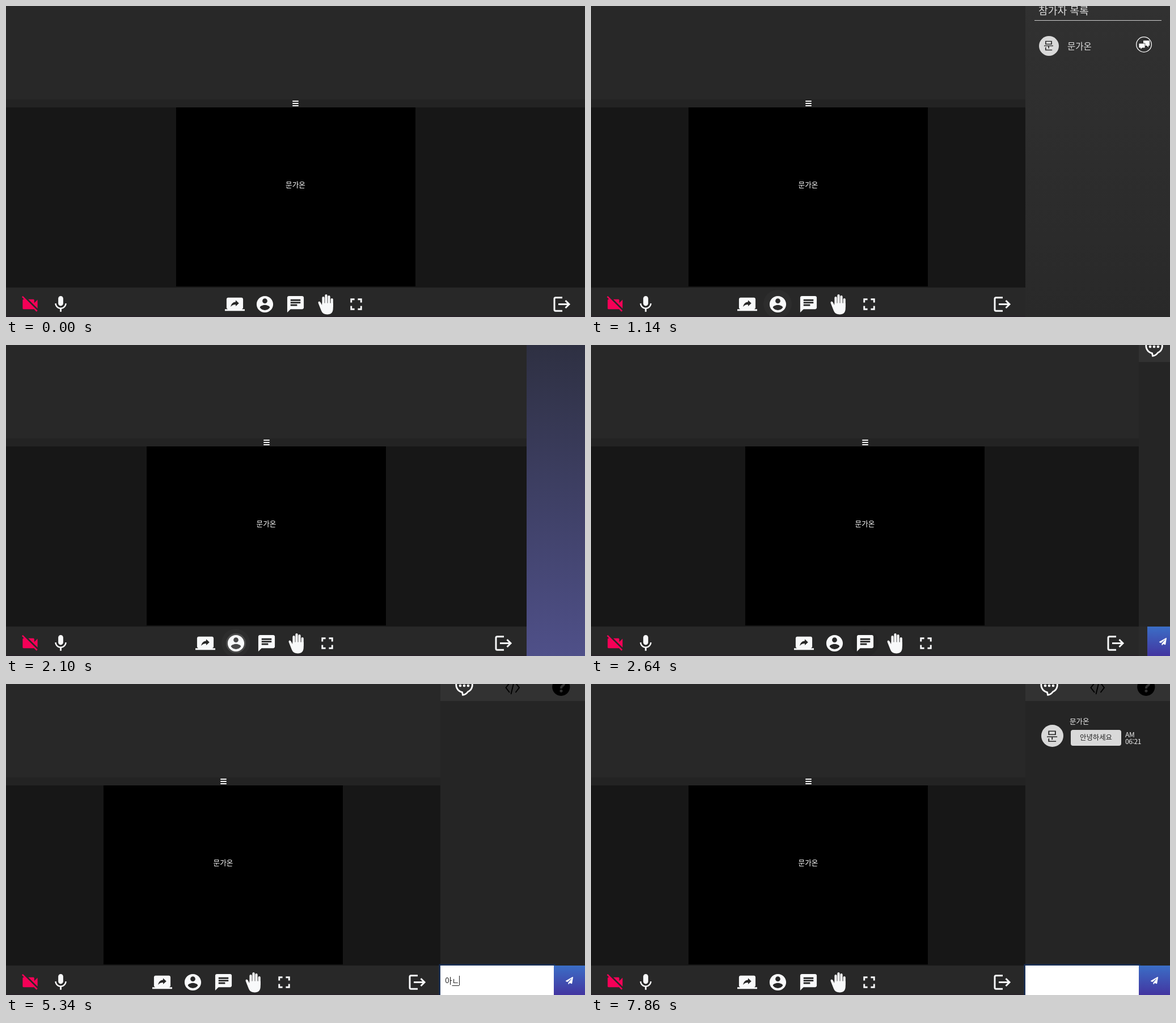
Animation of 1021 by 549 pixels, one loop 8 s. Source, as an HTML page:

```html
<!DOCTYPE html>
<html lang="ko">
<head>
<meta charset="utf-8">
<title>화상 회의</title>
<style>
@property --w { syntax: '<length>'; inherits: true; initial-value: 1021px; }

html, body { margin: 0; width: 100%; height: 100%; overflow: hidden; background: #282828; }
#stage {
  position: relative; width: 1021px; height: 549px; overflow: hidden;
  background: linear-gradient(#2e3042, #4f5089);
  font-family: "Noto Sans CJK KR", "Noto Sans KR", "Noto Sans CJK", "Noto Sans", sans-serif;
  animation: resize 8s step-end infinite;
}
#stage * { box-sizing: border-box; }
#stage div, #stage svg { position: absolute; }
svg { overflow: visible; }

/* width left for the call while side panels open and close */
@keyframes resize {
  0% { --w: 1021px; }
  10.5% { --w: 1013px; } 11.25% { --w: 937px; } 12% { --w: 847px; }
  12.75% { --w: 795px; } 13.5% { --w: 771px; } 14.25% { --w: 766px; }
  25.5% { --w: 810px; } 26.25% { --w: 918px; } 27% { --w: 977px; }
  27.75% { --w: 1010px; } 28.5% { --w: 1021px; }
  32.25% { --w: 1008px; } 33% { --w: 966px; } 33.75% { --w: 960px; }
  34.5% { --w: 958px; } 37.5%, 100% { --w: 766px; }
}

.main { left: 0; top: 0; width: var(--w); height: 549px; background: #171717; overflow: hidden; }
.top { width: 100%; height: 165px; background: #282828; }
.grip { top: 165px; width: 100%; height: 14px; background: #232323; }
.grip i {
  position: absolute; left: calc(50% - 5.5px); width: 11px; height: 2px;
  border-radius: 1px; background: #f4f4f4;
}
.video { left: calc(50% - 211px); top: 179px; width: 422px; height: 316px; background: #000; }
.bar { top: 497px; width: 100%; height: 52px; background: #282828; border-bottom: 2px solid #282229; }
.icon { left: calc(50% + var(--n) * 53.6px - 17.5px); top: 11.5px; width: 35px; height: 35px; fill: #f8f9fa; }
.line { fill: none; stroke: #f8f9fa; }
.halo { border-radius: 50%; opacity: 0; left: calc(50% + var(--n) * 53.6px - var(--r)); top: calc(29px - var(--r));
  width: calc(2 * var(--r)); height: calc(2 * var(--r)); }
.hover { --n: -1; --r: 25px; background: #ffffff06; animation: hover 8s step-end infinite; }
.ripple { --n: -1; --r: 17.5px; background: #ffffff24; animation: ripple 8s step-end infinite; }
.press { --n: 0; --r: 24px; background: #00000010; animation: press 8s step-end infinite; }
@keyframes hover { 10.5% { opacity: 1; } 28.5% { opacity: 0; } }
@keyframes ripple { 24.75% { opacity: 1; } 28.5% { opacity: 0; } }
@keyframes press { 32.25% { opacity: 1; } 38.25% { opacity: 0; } }

.t { line-height: 20px; white-space: nowrap; color: #dcdcdc; }
.mid { transform: translateX(-50%); }
.avatar { border-radius: 50%; background: #d9d9d9; color: #222; text-align: center; font-weight: 500; }

.panel { left: var(--w); top: 0; width: calc(1021px - var(--w)); height: 549px; visibility: hidden; }
.people { background: linear-gradient(#313131, #292929); animation: people 8s step-end infinite; }
.chat { background: #252525; animation: chat 8s step-end infinite; }
@keyframes people { 10.5% { visibility: visible; } 24.75% { visibility: hidden; } }
@keyframes chat { 32.25%, 100% { visibility: visible; } }

.tabs { width: 100%; height: 29.5px; background: #323232; }
.tabs svg { --col: max(33.333%, 54px); left: calc(var(--col) * (var(--k) + .5)); top: 0; width: 1px; height: 1px; }
.field {
  left: 0; top: 497px; width: max(15px, 100% - 55px); height: 52px; padding-left: 8px;
  display: flex; align-items: center; background: #2b2b2b;
  font-size: 13.6px; font-weight: 300; color: #222; white-space: pre;
  animation: field 8s step-end infinite;
}
@keyframes field {
  37.5% { background: #fff; }
  44.25% { background: #fff; box-shadow: 0 0 0 1.5px #15305c60; }
  45%, 100% { background: #fff; box-shadow: 0 0 0 2.5px #15356cb0; }
}
#live { text-decoration: underline 1px; text-underline-offset: 3px; }
.caret { width: 1px; height: 17px; background: #222; opacity: 0; animation: caret 8s step-end infinite; }
#stage .caret { position: static; }
@keyframes caret { 44.25% { opacity: 1; } 51% { opacity: 0; } 53.25% { opacity: 1; } 98.25%, 100% { opacity: 0; } }
.send { left: max(15px, 100% - 55px); top: 497px; width: 55px; height: 52px; background: linear-gradient(#3b6ec6, #4335a0); }
.send svg { left: 21px; top: 20px; width: 13px; height: 13px; fill: #fff; }
.message { left: 0; top: 0; opacity: 0; animation: message 8s step-end infinite; }
@keyframes message { 93%, 100% { opacity: 1; } }
.bubble { left: 80px; top: 81px; width: 89px; height: 28px; border-radius: 4px; background: #d9d9d9; }
</style>
</head>
<body>
<div id="stage">
  <div class="main">
    <div class="top"></div>
    <div class="grip"><i style="top:2px"></i><i style="top:6px"></i><i style="top:10px"></i></div>
    <div class="video"></div>
    <div class="t mid" style="left:50%;top:305px;font-size:12.6px;color:#fff">문가온</div>
    <div class="bar">
      <div class="halo hover"></div><div class="halo ripple"></div><div class="halo press"></div>
      <svg class="icon" style="left:24.5px;fill:#f50057" viewBox="0 0 24 24"><path d="M21 6.5l-4 4V7c0-.55-.45-1-1-1H9.82L21 17.18V6.5zM3.27 2L2 3.27 4.73 6H4c-.55 0-1 .45-1 1v10c0 .55.45 1 1 1h12c.21 0 .39-.08.54-.18L19.73 21 21 19.73 3.27 2z"/></svg>
      <svg class="icon" style="left:78.5px" viewBox="0 0 24 24"><path d="M12 14c1.66 0 2.99-1.34 2.99-3L15 5c0-1.66-1.34-3-3-3S9 3.34 9 5v6c0 1.66 1.34 3 3 3zm5.3-3c0 3-2.54 5.1-5.3 5.1S6.7 14 6.7 11H5c0 3.41 2.72 6.23 6 6.72V21h2v-3.28c3.28-.48 6-3.3 6-6.72h-1.7z"/></svg>
      <svg class="icon" style="--n:-2" viewBox="0 0 24 24"><path d="M20 18c1.1 0 1.99-.9 1.99-2L22 6c0-1.11-.9-2-2-2H4c-1.11 0-2 .89-2 2v10c0 1.1.89 2 2 2H0v2h24v-2h-4zm-7-3.53v-2.19c-2.78 0-4.61.85-6 2.72.56-2.67 2.11-5.33 6-5.87V7l4 3.73-4 3.74z"/></svg>
      <svg class="icon" style="--n:-1" viewBox="0 0 24 24"><path d="M12 2C6.48 2 2 6.48 2 12s4.48 10 10 10 10-4.48 10-10S17.52 2 12 2zm0 3c1.66 0 3 1.34 3 3s-1.34 3-3 3-3-1.34-3-3 1.34-3 3-3zm0 14.2c-2.5 0-4.71-1.28-6-3.22.03-1.99 4-3.08 6-3.08 1.99 0 5.97 1.09 6 3.08-1.29 1.94-3.5 3.22-6 3.22z"/></svg>
      <svg class="icon" style="--n:0" viewBox="0 0 24 24"><path d="M20 2H4c-1.1 0-1.99.9-1.99 2L2 22l4-4h14c1.1 0 2-.9 2-2V4c0-1.1-.9-2-2-2zM6 9h12v2H6V9zm8 5H6v-2h8v2zm4-6H6V6h12v2z"/></svg>
      <svg class="icon" style="--n:1" viewBox="-17.5 -17.5 35 35">
        <path class="line" stroke-width="4.2" stroke-linecap="round" d="M-5 3V-11.5M0 0V-15.3M5 0V-13.5M10.2 4V-8.5"/>
        <path d="M-7.1 1.5V2L-10-3.5Q-11.2-5.6-13-4.8Q-14.5-4-13.8-2L-8.5 11.5Q-6 18 2 18Q12.3 18 12.3 7V-2H-7.1Z"/>
      </svg>
      <svg class="icon" style="--n:2" viewBox="0 0 24 24"><path d="M7 14H5v5h5v-2H7v-3zm-2-4h2V7h3V5H5v5zm12 7h-3v2h5v-5h-2v3zM14 5v2h3v3h2V5h-5z"/></svg>
      <svg class="icon line" style="left:calc(100% - 59.5px)" viewBox="-17.5 -17.5 35 35" stroke-width="3">
        <path d="M1.5-11.7H-10.3Q-12.5-11.7-12.5-9.5V9.5Q-12.5 11.7-10.3 11.7H1.5M-5.5 0H13M7-6.5L13.5 0L7 6.5"/>
      </svg>
    </div>
  </div>

  <div class="panel people">
    <div class="t" style="left:23px;top:-3px;font-size:18.2px;font-weight:500">참가자 목록</div>
    <div style="left:16px;top:25px;width:224px;height:1px;background:#cfcfcf"></div>
    <div class="avatar" style="left:23.5px;top:52.5px;width:35px;height:35px;font-size:19.5px;line-height:32px">문</div>
    <div class="t" style="left:74px;top:60px;font-size:15.5px;font-weight:500">문가온</div>
    <svg style="left:209px;top:68px;width:1px;height:1px" fill="#fff">
      <circle r="13.3" fill="none" stroke="#fff" stroke-width="1.3"/>
      <path d="M-1-7H10V2H8V5L5 2H-1Z"/>
      <path d="M-9-2H2V6H-3L-6 9V6H-9Z" stroke="#2e2e2e" stroke-width=".8"/>
    </svg>
  </div>

  <div class="panel chat">
    <div class="tabs">
      <svg style="--k:0" fill="#fff">
        <path fill="none" stroke="#fff" stroke-width="2.8" d="M-3.5 14.7A14.2 13.2 0 1 1 6.5 13.7Q3 18.5-2.5 19.3Z"/>
        <circle cx="-7" cy="3" r="2.3"/><circle cy="3" r="2.3"/><circle cx="7" cy="3" r="2.3"/>
      </svg>
      <svg style="--k:1" fill="none" stroke="#000" stroke-width="1.9"><path d="M-5-2L-11.5 6.5L-5 15M5.5-2L12 6.5L5.5 15M3-5L-2.5 18"/></svg>
      <svg style="--k:2">
        <circle cx=".8" cy="5.3" r="15.6"/>
        <path fill="none" stroke="#323232" stroke-width="4" d="M-4-1Q-3-4.5 1-4.5Q6-4.5 6-.5Q6 2 3 3.5Q1 4.7 1 8"/>
        <circle cx="1" cy="12.2" r="2.5" fill="#323232"/>
      </svg>
    </div>
    <div class="message">
      <div class="avatar" style="left:27.5px;top:72px;width:39px;height:39px;font-size:22px;line-height:36px">문</div>
      <div class="t" style="left:78px;top:56px;font-size:12.5px;font-weight:300;color:#eee">문가온</div>
      <div class="bubble"></div>
      <div class="t mid" style="left:124.5px;top:84px;font-size:12.4px;font-weight:300;color:#222">안녕하세요</div>
      <div class="t" style="left:176px;top:82.5px;font-size:12px;line-height:12px;font-weight:300;letter-spacing:-.4px;color:#eee">AM<br>06:21</div>
    </div>
    <div class="field"><span id="done"></span><span id="live"></span><div class="caret"></div></div>
    <div class="send"><svg viewBox="0 0 512 512"><path d="M476 3.2L12.5 270.6c-18.1 10.4-15.8 35.6 2.2 43.2L121 358.4l287.3-253.2c5.5-4.9 13.3 2.6 8.6 8.3L176 407v80.5c0 23.6 28.5 32.9 42.5 15.8L282 426l124.6 52.2c14.2 6 30.4-2.9 33-18.2l72-432C515 7.8 493.3-6.8 476 3.2z"/></svg></div>
  </div>
</div>
<script>
// Input contents over time; the last syllable is the one being composed.
const typing = [
  [0, ''], [4260, 'ㅇ'], [4380, '아'], [4500, '안'],
  [4800, '아'], [4860, 'ㅇ'], [4920, ''], [4980, 'ㅇ'], [5100, '아'],
  [5340, '아ㄴ'], [5460, '아녀'],
  [5760, '아ㄴ'], [5820, '아'], [5880, ''], [5940, 'ㅇ'], [6060, '아'], [6180, '안'],
  [6300, '안ㄴ'], [6420, '안녀'], [6540, '안녕'],
  [6600, '안녕ㅎ'], [6720, '안녕하'], [6840, '안녕핫'], [6960, '안녕하세'],
  [7080, '안녕하셍'], [7140, '안녕하세요'], [7380, '']
];
const done = document.getElementById('done');
const live = document.getElementById('live');
let start, shown = '';

function draw(now) {
  start ??= now;
  const t = (now - start) % 8000;
  const text = typing.findLast(([at]) => at <= t)[1];
  if (text !== shown) {
    done.textContent = text.slice(0, -1);
    live.textContent = text.slice(-1);
    shown = text;
  }
  requestAnimationFrame(draw);
}
requestAnimationFrame(draw);
</script>
</body>
</html>
```
